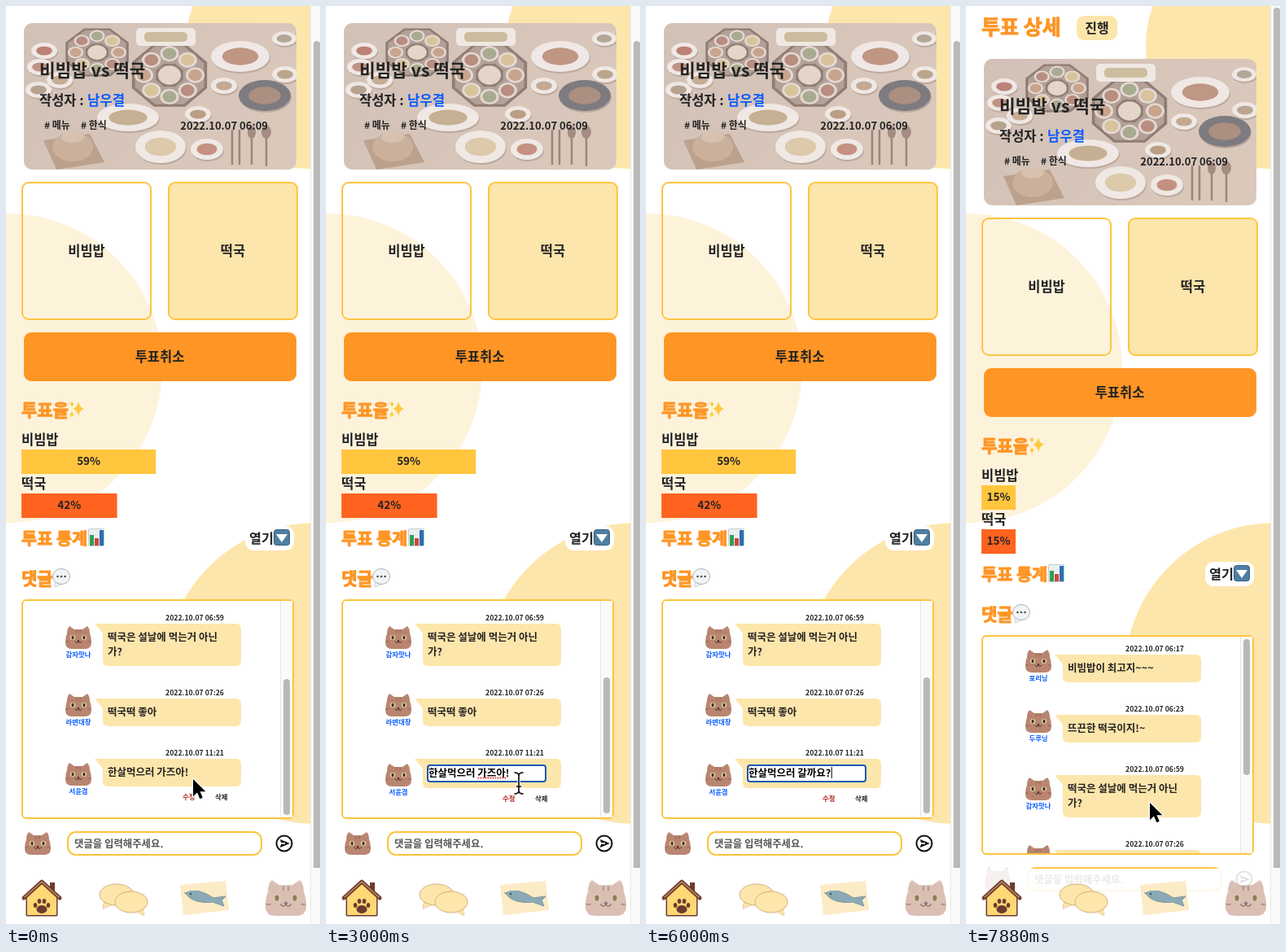
Write an HTML page with a canvas that moves like this. It is 386 by 1128 pixels and loops after 8 s.

```html
<!DOCTYPE html>
<html lang="ko">
<head>
<meta charset="utf-8">
<style>
html, body { margin: 0; width: 100%; height: 100%; overflow: hidden; background: #fff; }
canvas { display: block; }
</style>
</head>
<body>
<canvas id="stage" width="386" height="1128"></canvas>
<script>
const g = document.getElementById('stage').getContext('2d');
const FONT = '"Noto Sans CJK KR", "Noto Sans CJK JP", "Noto Sans CJK", sans-serif';
const INK = '#232323', ORANGE = '#ff9524', GOLD = '#fcc540', CREAM = '#fde6ab',
      BLUE = '#0a5cff', BROWN = '#6b3d32';
const LOOP = 8000, STEP = 125, EDIT = 1125, FOCUS = 2500, SAVED = 7375, RELOAD = 7875;

const comments = [
  { y: 604, time: '06:17', name: '포리닝', lines: ['비빔밥이 최고지~~~'] },
  { y: 678, time: '06:23', name: '두루닝', lines: ['뜨끈한 떡국이지!~'] },
  { y: 752, time: '06:59', name: '감자맛나', lines: ['떡국은 설날에 먹는거 아닌', '가?'], drop: 9 },
  { y: 844, time: '07:26', name: '라면대장', lines: ['떡국떡 좋아'] },
  { y: 918, time: '11:21', name: '서윤겸', lines: ['한살먹으러 가즈아!'], drop: 11, own: true }
];

// [start, end of the sentence, last letter still being composed]
const typing = [
  [FOCUS, '가즈아!'], [3375, '가즈아'], [3625, '가즈'], [3750, '가'], [3875, ''],
  [4125, 'ㄱ', 1], [4250, '가', 1], [4375, '갈', 1], [4625, '갈ㄲ', 1], [4750, '갈까', 1],
  [4875, '갈깨', 1], [5125, '갈ㄲ', 1], [5250, '갈까', 1], [5375, '갈깡', 1],
  [5500, '갈까요', 1], [5750, '갈까요?']
];

// [time, x, y] of the pointer's hot spot
const pointerPath = [
  [0, 230, 950], [500, 228, 971], [1875, 228, 971], [2375, 237, 955], [6125, 237, 955],
  [6500, 228, 987], [7000, 228, 987], [7375, 230, 981], [7750, 230, 981], [RELOAD, 226, 979]
];

function box(x, y, w, h, r, fill, stroke, lw = 2) {
  const i = stroke ? lw / 2 : 0;
  g.beginPath();
  g.roundRect(x + i, y + i, w - 2 * i, h - 2 * i, r);
  if (fill) { g.fillStyle = fill; g.fill(); }
  if (stroke) { g.strokeStyle = stroke; g.lineWidth = lw; g.stroke(); }
}

function oval(x, y, rx, ry, fill, turn = 0, stroke) {
  g.beginPath();
  g.ellipse(x, y, rx, ry, turn, 0, Math.PI * 2);
  if (fill) { g.fillStyle = fill; g.fill(); }
  if (stroke) { g.strokeStyle = stroke; g.lineWidth = 1; g.stroke(); }
}

function shape(d, x, y, scale, fill, stroke, lw = 1) {
  const p = new Path2D(d);
  g.save();
  g.translate(x, y);
  g.scale(scale, scale);
  g.lineJoin = g.lineCap = 'round';
  if (stroke) { g.strokeStyle = stroke; g.lineWidth = lw; g.stroke(p); }
  if (fill) { g.fillStyle = fill; g.fill(p); }
  g.restore();
}

function text(s, x, y, size, color = INK, align = 'left') {
  g.font = `700 ${size}px ${FONT}`;
  g.fillStyle = color;
  g.textAlign = align;
  g.fillText(s, x, y + size * 0.365);
}

function heading(s, y, size) {
  text(s, 19, y, size, ORANGE);
  g.strokeStyle = ORANGE;
  g.lineWidth = 0.9;
  g.strokeText(s, 19, y + size * 0.365);
}

function octagon(x, y, rx, ry, fill) {
  g.beginPath();
  for (let i = 0; i < 8; i++) {
    const a = (i + 0.5) * Math.PI / 4;
    g.lineTo(x + rx * Math.cos(a), y + ry * Math.sin(a));
  }
  g.fillStyle = fill;
  g.fill();
}

function cat(x, y, scale = 1, alpha = 1) {
  g.save();
  g.globalAlpha *= alpha;
  shape('M-11-14L-5-10H5L11-14Q14-11 14-5Q16 0 16 6Q16 14 8 14H-8Q-16 14-16 6Q-16 0-14-5Q-14-11-11-14Z',
    x, y, scale, '#b98571');
  shape('M-2-9V-6M2-9V-6M-15 5H-12M15 5H12', x, y, scale, null, '#94614f');
  for (const side of [-1, 1]) {
    oval(x + side * 7 * scale, y, 3.2 * scale, 3 * scale, '#e9d59c');
    oval(x + side * 7 * scale, y, 1.6 * scale, 2.3 * scale, '#3a302d');
  }
  shape('M-4 5Q-2 8 0 5Q2 8 4 5', x, y, scale, null, '#503229');
  oval(x, y + 4 * scale, 1.4 * scale, scale, '#503229');
  g.restore();
}

function tray(x, y, rx, ry) {
  octagon(x, y, rx, ry, '#8f7d75');
  octagon(x, y, rx * 0.92, ry * 0.92, '#b3a097');
  const foods = ['#c9a48c', '#b98d80', '#a9ab90', '#d8c39c'];
  for (let i = 0; i < 8; i++) {
    const a = i * Math.PI / 4, cx = x + rx * 0.63 * Math.cos(a), cy = y + ry * 0.63 * Math.sin(a);
    oval(cx, cy, rx * 0.23, ry * 0.23, '#e3d9d2');
    oval(cx, cy, rx * 0.17, ry * 0.17, foods[i % 4]);
  }
  octagon(x, y, rx * 0.36, ry * 0.36, '#8f7d75');
  oval(x, y, rx * 0.28, ry * 0.28, '#e3d6c8');
}

function dish(x, y, rx, ry, food, rim = '#efe8e4') {
  oval(x + 1, y + 2, rx, ry, '#bda99e');
  oval(x, y, rx, ry, rim);
  oval(x, y, rx * 0.62, ry * 0.56, food);
}

function photo() {
  g.save();
  g.beginPath();
  g.roundRect(22, 21, 335, 180, 10);
  g.clip();
  const tone = g.createLinearGradient(22, 21, 300, 201);
  tone.addColorStop(0, '#d2c1b7');
  tone.addColorStop(1, '#dac8bb');
  g.fillStyle = tone;
  g.fillRect(22, 21, 335, 180);
  tray(112, 57, 42, 32);
  tray(201, 85, 50, 42);
  box(160, 27, 73, 22, 5, '#efe8e4');
  box(170, 32, 53, 12, 5, '#cdbd9e');
  dish(288, 62, 36, 19, '#c09685');
  dish(318, 110, 32, 19, '#ab8f80', '#7d7b80');
  dish(342, 40, 15, 9, '#b4a596');
  for (const [x, y, food] of [[47, 55, '#bd8277'], [42, 75, '#c19282'], [40, 103, '#b7a18f'],
    [66, 91, '#c7ac94'], [236, 133, '#bb9f83'], [343, 84, '#bba58f'], [268, 98, '#c2a992']])
    dish(x, y, 16, 10, food);
  dish(150, 137, 38, 17, '#c5b093');
  dish(190, 173, 31, 20, '#dccaab');
  dish(247, 176, 20, 13, '#c49181');
  shape('M46 165L103 157L121 192L62 201Z', 0, 0, 1, '#bca18d');
  oval(82, 173, 25, 18, '#cbb09b');
  oval(82, 161, 14, 7, '#d8c2af');
  shape('M278 153V194M287 153V194M302 163V194M320 163V196', 0, 0, 1, null, '#9c8578', 2.5);
  oval(302, 155, 5, 8, '#a38d80');
  oval(320, 155, 6, 8, '#a38d80');
  g.restore();
}

function emojis() {
  const star = 'M0-8Q1.2-1.2 6 0Q1.2 1.2 0 8Q-1.2 1.2-6 0Q-1.2-1.2 0-8Z';
  shape(star, 89, 495, 1.15, '#ffc83d');
  shape(star, 81, 489, 0.5, '#ffc83d');
  shape(star, 81, 502, 0.55, '#ffc83d');

  box(101, 642, 20, 22, 1, '#e9eef0', '#c3cdd2', 1);
  box(103, 650, 5, 13, 0, '#2f9e57');
  box(109, 654, 5, 9, 0, '#d84437');
  box(115, 644, 5, 19, 0, '#2b6fb5');

  shape('M61 707L60 714L69 710Z', 0, 0, 1, '#f2f4f5', '#aab2b7');
  oval(68, 701, 10.5, 9.5, '#f2f4f5', 0, '#aab2b7');
  for (const x of [63.5, 68, 72.5]) oval(x, 701, 1.3, 1.3, '#4b5358');

  box(329, 643, 20, 20, 3, '#4e7fa3', '#365f7e', 1);
  shape('M332 649H346L339 659Z', 0, 0, 1, '#fff');
}

function bar(label, y, share, color) {
  const w = 2.8 * share;
  text(label, 19, y - 12, 16.5);
  box(19, y, w, 30, 0, color);
  text(share + '%', 19 + w / 2, y + 14, 13.5, INK, 'center');
}

function editor(t) {
  const focused = t >= FOCUS;
  if (focused) box(124, 932, 147, 22, 3, '#fff', '#1259b5');
  else box(125, 934, 145, 19, 0, '#fff');
  const [since, tail, composing] = typing.filter(k => k[0] <= t).pop() || typing[0];
  const line = '한살먹으러 ' + tail;
  text(line, 126, 942, 12.5, '#000');
  if (!focused) return;
  const width = s => g.measureText(s).width;
  const end = 126 + width(line);
  if (composing) box(126 + width(line.slice(0, -1)), 948, width(line.slice(-1)), 1, 0, '#000');
  if (tail === '가즈아!')
    for (let x = 127 + width('한살먹으러 '); x < end - 4; x += 3) oval(x, 948.5, 1, 1, '#e0322b');
  if ((t - since) % 1000 < 500) box(end + 0.5, 935, 1, 14, 0, '#000');
}

function commentList(t) {
  const editing = t >= EDIT && t < SAVED, top = t >= RELOAD;
  box(19, 729, 335, 270, 5, '#fff', GOLD);
  g.save();
  g.beginPath();
  g.rect(21, 731, 317, 266);
  g.clip();
  if (top) g.translate(0, 142);
  for (const { y, time, name, lines, drop = 0, own } of comments) {
    const edit = own && editing, low = y + drop + (edit ? 1 : 0);
    text('2022.10.07 ' + time, 268, y, 8.7, INK, 'right');
    cat(89, low + 15);
    text(name, 89, low + 36, 8.4, BLUE, 'center');
    box(119, y + 7, 170, 16 + 18 * lines.length + (edit ? 2 : 0), 6, CREAM);
    shape('M109 7H131L120 20Z', 0, y, 1, CREAM);
    if (edit) editor(t);
    else lines.forEach((line, i) => text(line, 125, y + 23 + 18 * i, 12.5));
    if (own) {
      text('수정', 217, y + (edit ? 56 : 54), 8.4, '#b3261e');
      text('삭제', 257, y + (edit ? 56 : 54), 8.4);
    }
  }
  g.restore();
  box(338, 731, 14, 266, 0, '#fafafa');
  box(337, 731, 1, 266, 0, '#e6e6e6');
  box(341, top ? 734 : editing ? 825 : 827, 8, 167, 4, '#b9b9b9');
}

function page(t) {
  const fresh = t >= RELOAD;
  heading('투표 상세', -18, 25);
  box(136, -32, 50, 30, 9, CREAM);
  text('진행', 161, -17, 16, INK, 'center');

  photo();
  text('비빔밥 vs 떡국', 41, 79, 21.3);
  text('작성자 :', 41, 116, 16.5);
  text('남우결', 100, 116, 16.7, BLUE);
  text('# 메뉴', 47, 147, 12);
  text('# 한식', 92, 147, 12);
  text('2022.10.07 06:09', 322, 147, 13, INK, 'right');

  box(19, 216, 160, 170, 8, null, GOLD);
  box(199, 216, 160, 170, 8, CREAM, GOLD);
  text('비빔밥', 99, 301, 16.5, INK, 'center');
  text('떡국', 279, 301, 16.5, INK, 'center');
  box(22, 401, 335, 60, 9, ORANGE);
  text('투표취소', 189, 431, 16.5, INK, 'center');

  heading('투표율', 496, 21);
  bar('비빔밥', 545, fresh ? 15 : 59, '#ffc53d');
  bar('떡국', 599, fresh ? 15 : 42, '#ff631f');
  heading('투표 통계', 654, 20.8);
  box(294, 639, 60, 30, 10, '#fff');
  text('열기', 299, 654, 16.3);
  heading('댓글', 703, 21);
  emojis();
  commentList(t);

  cat(39, 1029);
  box(75, 1014, 240, 30, 10, '#fff', GOLD);
  text('댓글을 입력해주세요.', 84, 1029, 12.4, '#555');
  shape('M9.5 0A9.5 9.5 0 1 1-9.5 0A9.5 9.5 0 1 1 9.5 0Z', 342, 1029, 1, null, '#111', 2);
  shape('M-5-5L7 0L-5 5L-4 1H1V-1H-4Z', 342, 1029, 1, '#111');
}

function nav() {
  box(0, 1060, 374, 68, 0, 'rgba(255,255,255,.88)');
  box(54, 1077, 6, 12, 0, BROWN);
  shape('M26 1094L44 1078L62 1094V1117H26Z', 0, 0, 1, '#ffd873', BROWN, 3);
  shape('M22 1096L44 1076L66 1096', 0, 0, 1, null, BROWN, 5);
  shape('M23 1095L44 1076L65 1095', 0, 0, 1, null, '#c58c5d', 1.5);
  oval(44, 1110, 6.5, 5, BROWN);
  for (const [x, y] of [[36, 1105], [41, 1100], [47, 1100], [52, 1105]]) oval(x, y, 2.3, 3, BROWN);

  const line = '#cdb27a';
  shape('M121 1100L119 1109L131 1104Z', 0, 0, 1, CREAM, line);
  oval(136, 1092, 21, 13, CREAM, 0, line);
  shape('M160 1112L170 1118L168 1108Z', 0, 0, 1, CREAM, line);
  oval(154, 1101, 20, 13, CREAM, 0, line);

  shape('M214 1080L270 1075L274 1111L218 1117Z', 0, 0, 1, '#fdebc5');
  shape('M220 1090Q235 1082 255 1096L270 1094L265 1099L268 1106L254 1101Q230 1104 220 1090Z',
    0, 0, 1, '#8aa9b6', '#66808c');
  oval(227, 1091, 1.2, 1.2, '#3d4c54');
  cat(344, 1096, 1.57, 0.52);
}

function pointer(t) {
  const i = Math.max(1, pointerPath.findIndex(k => k[0] >= t));
  const [t0, x0, y0] = pointerPath[i - 1], [t1, x1, y1] = pointerPath[i];
  const u = (t - t0) / (t1 - t0), ease = u * u * (3 - 2 * u);
  const x = x0 + (x1 - x0) * ease, y = y0 + (y1 - y0) * ease;
  if (t < 375 || t >= RELOAD) {
    const arrow = 'M0 0V17L4 13.2L6.7 19.3L9.4 18.1L6.8 12.2H12.3Z';
    shape(arrow, x, y, 1.25, '#000', '#fff', 2);
  } else if (t >= 2250 && t < 3375) {
    const beam = 'M-5-13Q0-13 0-9Q0-13 5-13M0-9V9M-5 13Q0 13 0 9Q0 13 5 13M-2.5 4H2.5';
    shape(beam, x, y, 1, null, '#fff', 3.5);
    shape(beam, x, y, 1, null, '#000', 1.6);
  } else if (t < 2250 || t >= 6125) {
    shape('M-2 13V2.5a2.2 2.2 0 0 1 4.4 0V10c.4-2 4-2 4.2.4c.8-1.6 3.8-1.3 4 .8c1-1 3.6-.6 3.6 1.8v4c0 3-2.2 4-2.2 8.5H1.5c0-3-2.5-4.5-4-7.5L-5.6 14c-1.2-2 1.4-3.6 3.6-1z',
      x, y, 1, '#fff', '#000', 2.6);
    shape('M3.5 15V21M7 15V21M10.5 15V21', x, y, 1, null, '#000', 1.2);
  }
}

function draw(now) {
  const t = Math.floor((now % LOOP + 5) / STEP) * STEP % LOOP;
  const fresh = t >= RELOAD;
  g.fillStyle = '#fff';
  g.fillRect(0, 0, 386, 1128);
  oval(371, 50, 150, 150, CREAM);
  oval(2, 445, 190, 190, '#fdf3db');
  oval(380, 820, 185, 185, CREAM);
  g.save();
  if (fresh) g.translate(0, 44);
  page(t);
  g.restore();
  nav();
  box(374, 0, 12, 1128, 0, '#fafafa');
  box(374, 0, 1, 1128, 0, '#e8e8e8');
  box(378, fresh ? 2 : 43, 8, fresh ? 1057 : 1016, [4, 4, 0, 0], '#b9b9b9');
  pointer(t);
}

function tick() {
  draw(performance.now());
  requestAnimationFrame(tick);
}
tick();
</script>
</body>
</html>
```
